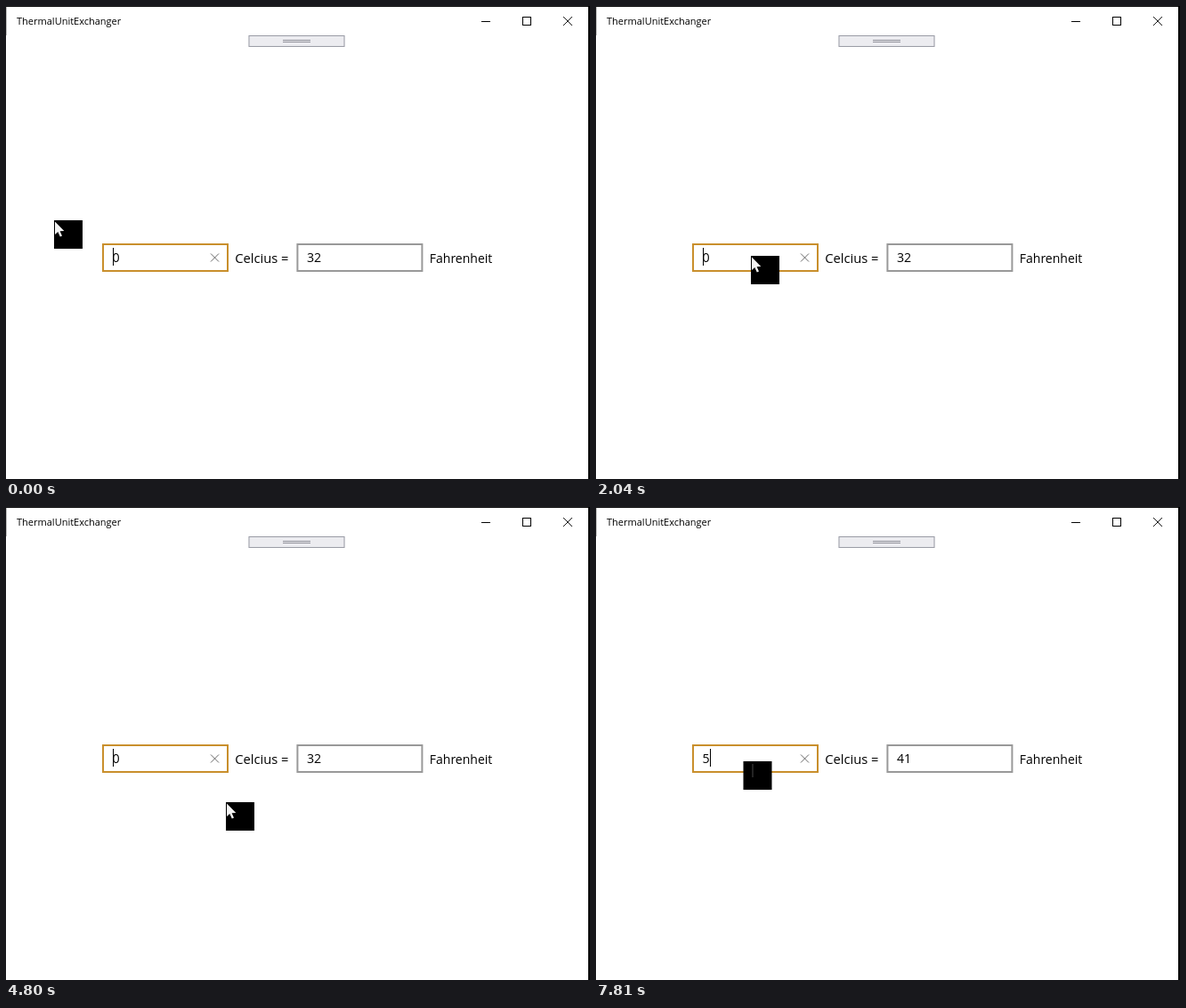
An HTML page with a canvas that plays this animation: 656x532 px, repeating every 8000 ms.

```html
<!DOCTYPE html>
<html lang="en">
<head>
<meta charset="utf-8">
<title>Unit converter</title>
<style>
  html, body { margin: 0; width: 100%; height: 100%; overflow: hidden; background: #fff; }
  canvas { display: block; }
</style>
</head>
<body>
<canvas id="stage" width="656" height="532"></canvas>
<script>
const ctx = document.getElementById('stage').getContext('2d');
const LOOP = 8000;
const TICK = 100 / 3;
const FONT = '"Open Sans", "Noto Sans", sans-serif';

const point = (x, y) => ({ x, y });

function box(x, y, w, h, color) {
  ctx.fillStyle = color;
  ctx.fillRect(x, y, w, h);
}

function frame(x, y, w, h, line, color) {
  ctx.strokeStyle = color;
  ctx.lineWidth = line;
  ctx.strokeRect(x + line / 2, y + line / 2, w - line, h - line);
}

function label(text, x, y, size) {
  ctx.fillStyle = '#000';
  ctx.font = `${size}px ${FONT}`;
  ctx.fillText(text, x, y);
}

function cross(x, y, size, color) {
  ctx.strokeStyle = color;
  ctx.lineWidth = 0.9;
  ctx.beginPath();
  ctx.moveTo(x, y);
  ctx.lineTo(x + size, y + size);
  ctx.moveTo(x + size, y);
  ctx.lineTo(x, y + size);
  ctx.stroke();
}

function glide(elapsed, ticks, from, bend, to) {
  const u = Math.min(1, Math.floor((elapsed + 8) / TICK) / ticks);
  const mix = axis => Math.round(
    (1 - u) ** 2 * from[axis] + 2 * u * (1 - u) * bend[axis] + u * u * to[axis]);
  return point(mix('x'), mix('y'));
}

function pointerAt(t) {
  if (t < 3340) {
    return glide(Math.max(0, t - 30), 16, point(54, 241), point(120, 281), point(174, 281));
  }
  if (t < 3740) {
    return glide(t - 3340, 5, point(171, 264), point(183, 220), point(166, 178));
  }
  if (t < 4540) return null;
  return glide(t - 4540, 13, point(290, 460), point(287, 317), point(180, 300));
}

function drawArrow({ x, y }) {
  box(x, y, 32, 32, '#000');
  ctx.fillStyle = '#f4f4f4';
  ctx.fill(new Path2D(`M${x + 1} ${y + 1.5} v14.5 l3.3 -3 l2.5 5.5 l2.2 -1 l-2.4 -5.3 l4.7 -0.2 z`));
}

function drawBeam(x, y) {
  box(x, y, 32, 32, '#000');
  box(x + 10, y + 3, 1, 15, '#484848');
}

function drawWindow() {
  box(0, 0, 656, 532, '#fff');
  box(0, 0, 656, 1, '#111');
  box(0, 1, 1, 32, '#bbb');
  box(654, 0, 2, 532, '#000');
  label('ThermalUnitExchanger', 12, 21, 11);

  box(534, 17, 10, 1, '#000');
  frame(580, 12, 10, 10, 1, '#000');
  cross(626, 12, 10, '#000');

  box(272.5, 33, 108, 13, '#ececf0');
  frame(272.5, 33, 108, 13, 1, '#999ba5');
  for (const y of [38, 40]) box(311, y, 31, 1, '#8e8f98');
}

function drawForm(t) {
  const celsius = t < 7370 ? '0' : t < 7810 ? '' : '5';
  const fahrenheit = t < 7810 ? 32 : 5 * 9 / 5 + 32;
  const caretAtEnd = t >= 5210 && celsius !== '';
  const caretVisible = t < 6770 || t >= 7270;

  frame(108, 267, 142, 32, 2, '#c98f2c');
  frame(326.4, 267, 142, 32, 2, '#999');
  label(celsius, 119.6, 288, 14.2);
  label(fahrenheit, 338, 288, 14.2);
  label('Celcius =', 257.2, 289, 14.7);
  label('Fahrenheit', 475.8, 289, 14);
  if (celsius) cross(230, 278.5, 9, '#555');
  if (caretVisible) box(caretAtEnd ? 128 : 120, 272, 1, 20, '#000');
}

function draw(t) {
  drawWindow();
  drawForm(t);
  const pointer = pointerAt(t);
  if (t >= 4970) drawBeam(165.5, 286);
  else if (pointer) drawArrow(pointer);
}

const began = performance.now();
function tick() {
  draw((performance.now() - began) % LOOP);
  requestAnimationFrame(tick);
}
tick();
</script>
</body>
</html>
```
